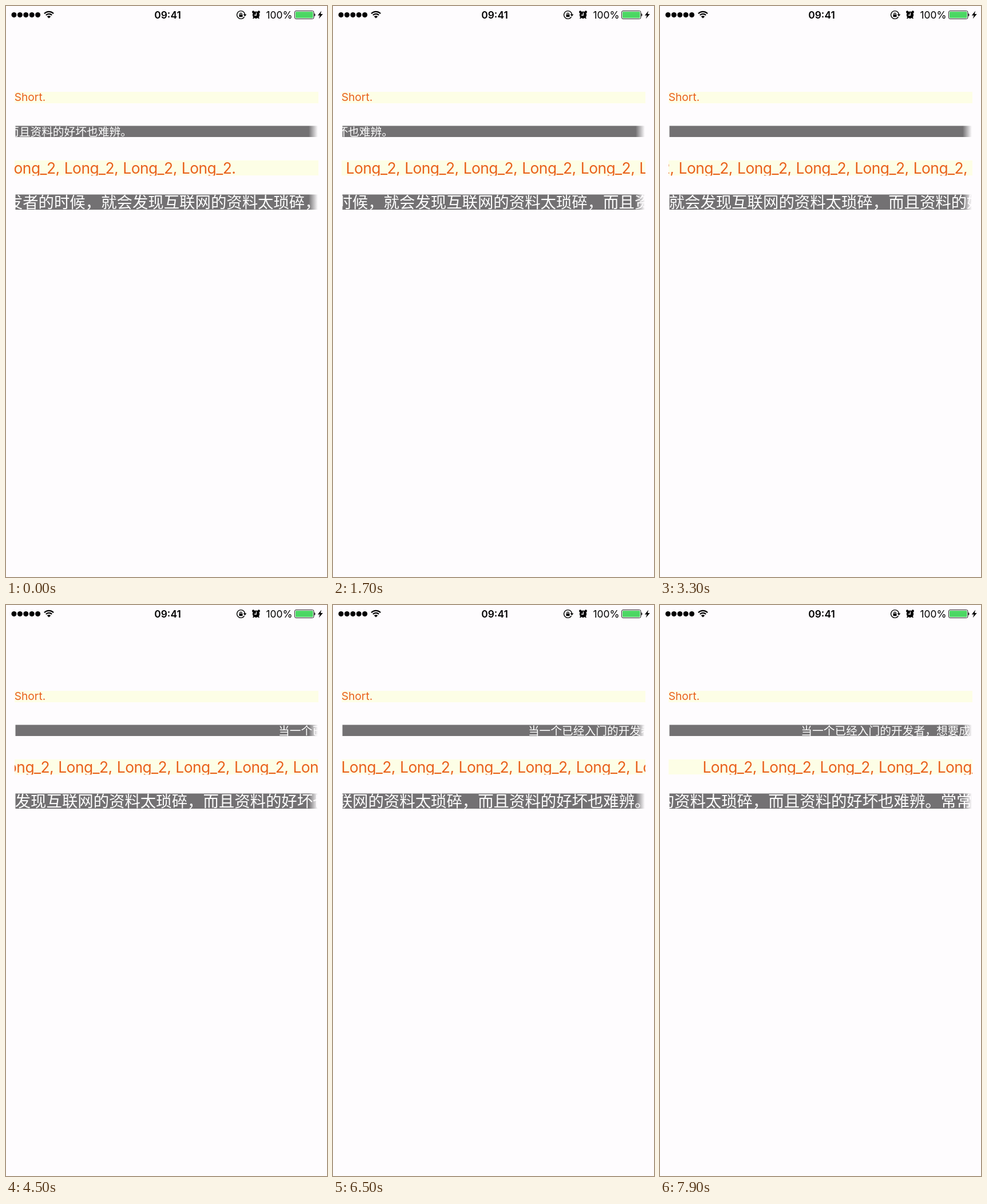
Recreate the animation shown at these times as an HTML page with a canvas. Size 561 px wide and 998 px high, loop 8 s.

```html
<!DOCTYPE html>
<html lang="zh">
<head>
<meta charset="utf-8">
<title>Marquee labels</title>
<style>
html, body { margin: 0; width: 100%; height: 100%; overflow: hidden; background: #fefcfe; }
canvas { display: block; width: 561px; height: 998px; }
</style>
</head>
<body>
<canvas id="stage" width="561" height="998"></canvas>
<script>
const ctx = document.getElementById('stage').getContext('2d');
const LOOP = 8000, STEP = 100;
const PAPER = '#fefcfe', CLEAR = 'rgba(254,252,254,0)';
const CREAM = '#fdfee6', ORANGE = '#e9601c', GREY = '#737173';
const LEFT = 15, RIGHT = 546;
const LATIN = 'Inter, Roboto, sans-serif';
const HAN = '"Noto Sans CJK SC", "Noto Sans CJK", sans-serif';

function text(str, x, y, font, color, spacing = '0px') {
  ctx.font = font;
  ctx.fillStyle = color;
  ctx.letterSpacing = spacing;
  ctx.fillText(str, x, y);
}

function dot(x, y, r) {
  ctx.beginPath();
  ctx.arc(x, y, r, 0, Math.PI * 2);
  ctx.fill();
}

function line(points, close) {
  ctx.beginPath();
  points.forEach(([x, y]) => ctx.lineTo(x, y));
  if (close) ctx.closePath();
}

function arc(x, y, r, from, to, width) {
  ctx.lineWidth = width;
  ctx.beginPath();
  ctx.arc(x, y, r, from, to);
  ctx.stroke();
}

function label(y, h, color, draw) {
  ctx.save();
  ctx.beginPath();
  ctx.rect(LEFT, y, RIGHT - LEFT, h);
  ctx.clip();
  ctx.fillStyle = color;
  ctx.fillRect(LEFT, y, RIGHT - LEFT, h);
  draw();
  ctx.restore();
}

function fade(from, to, y, h, inward) {
  const g = ctx.createLinearGradient(from, 0, to, 0);
  g.addColorStop(0, inward ? PAPER : CLEAR);
  g.addColorStop(1, inward ? CLEAR : PAPER);
  ctx.fillStyle = g;
  const x = inward ? LEFT - 1 : from;
  ctx.fillRect(x, y - 1, (inward ? to : RIGHT + 1) - x, h + 2);
}

function fadedLabel(y, h, draw) {
  label(y, h, GREY, draw);
  fade(15.5, 17.5, y, h, true);
  fade(529, 545, y, h, false);
}

function statusBar() {
  ctx.fillStyle = ctx.strokeStyle = '#000';
  for (let i = 0; i < 5; i++) dot(14 + i * 10.4, 15.5, 4.5);

  // wifi
  const up = -Math.PI / 2, half = 0.8;
  arc(75, 21, 11.2, up - half, up + half, 2.3);
  arc(75, 21, 7.2, up - half, up + half, 2.2);
  ctx.beginPath();
  ctx.moveTo(75, 21.5);
  ctx.arc(75, 21.5, 4.4, up - half, up + half);
  ctx.fill();

  ctx.textAlign = 'center';
  text('09:41', 282.5, 21.5, '600 17.4px ' + LATIN, '#000');
  ctx.textAlign = 'left';

  // rotation lock
  arc(410.5, 15.5, 6.9, 0.5, Math.PI * 2, 1.4);
  line([[414.6, 14.6], [420.4, 14.6], [417.5, 18.2]], true);
  ctx.fill();
  ctx.fillRect(407.5, 14.6, 6, 4.6);
  arc(410.5, 14.2, 1.9, Math.PI, Math.PI * 2, 1.2);

  // alarm clock
  dot(437, 15.7, 6.2);
  dot(432.2, 10.4, 2.2);
  dot(441.8, 10.4, 2.2);
  ctx.lineWidth = 1.8;
  line([[433.4, 19.5], [431.8, 22]]);
  ctx.stroke();
  line([[440.6, 19.5], [442.2, 22]]);
  ctx.stroke();
  ctx.strokeStyle = PAPER;
  ctx.lineWidth = 1.3;
  line([[437.4, 11.6], [437.4, 16], [434, 16]]);
  ctx.stroke();

  text('100%', 454.5, 21.7, '400 17.4px ' + LATIN, '#000');

  // battery
  ctx.strokeStyle = '#222';
  ctx.lineWidth = 1;
  ctx.beginPath();
  ctx.roundRect(504.5, 8.5, 33.5, 14, 2.5);
  ctx.stroke();
  ctx.fillStyle = '#4bd763';
  ctx.beginPath();
  ctx.roundRect(506, 10, 30.5, 11, 1.2);
  ctx.fill();
  ctx.fillStyle = '#222';
  ctx.beginPath();
  ctx.roundRect(538.4, 13, 2.1, 5, [0, 2, 2, 0]);
  ctx.fill();

  ctx.fillStyle = '#000';
  line([[551.3, 8.5], [544.8, 16.4], [548.6, 16.4], [546.8, 22.3], [553.8, 13.9], [549.8, 13.9]], true);
  ctx.fill();
}

// Runs right, rests two seconds at the label's edge, then runs on.
function wordsX(t) {
  const arrive = 5455, leave = 7454, speed = 0.1344;
  return LEFT + speed * (Math.min(t - arrive, 0) + Math.max(t - leave, 0));
}

function draw(t) {
  ctx.fillStyle = PAPER;
  ctx.fillRect(0, 0, 561, 998);
  statusBar();

  label(150, 20, CREAM, () =>
    text('Short.', 14.7, 166.3, '400 19.2px ' + LATIN, ORANGE));

  fadedLabel(209.3, 19.7, () => {
    const font = '350 19.73px ' + HAN, shift = -0.0676 * t;
    text('而且资料的好坏也难辨。', 3 + shift, 227.4, font, '#fff');
    text('当一个已经入门的开发者，想要成', 780.3 + shift, 227.4, font, '#fff');
  });

  label(269.5, 27, CREAM, () => {
    const x = wordsX(t), pitch = 102.55, count = 11;
    for (let i = 0; i < count; i++) {
      const word = i < count - 1 ? 'Long_2,' : 'Long_2.';
      text(word, x + i * pitch - 0.5, 292.6, '400 26.4px ' + LATIN, ORANGE, '-0.55px');
    }
  });

  fadedLabel(329.3, 26.9, () =>
    text('发者的时候，就会发现互联网的资料太琐碎，而且资料的好坏也难辨。常常',
      1.8 - 0.0456 * t, 353.4, '350 27.4px ' + HAN, '#fff'));
}

const start = performance.now();
function tick() {
  const t = (performance.now() - start) % LOOP;
  draw(Math.floor(t / STEP) * STEP);
  requestAnimationFrame(tick);
}
tick();
</script>
</body>
</html>
```
